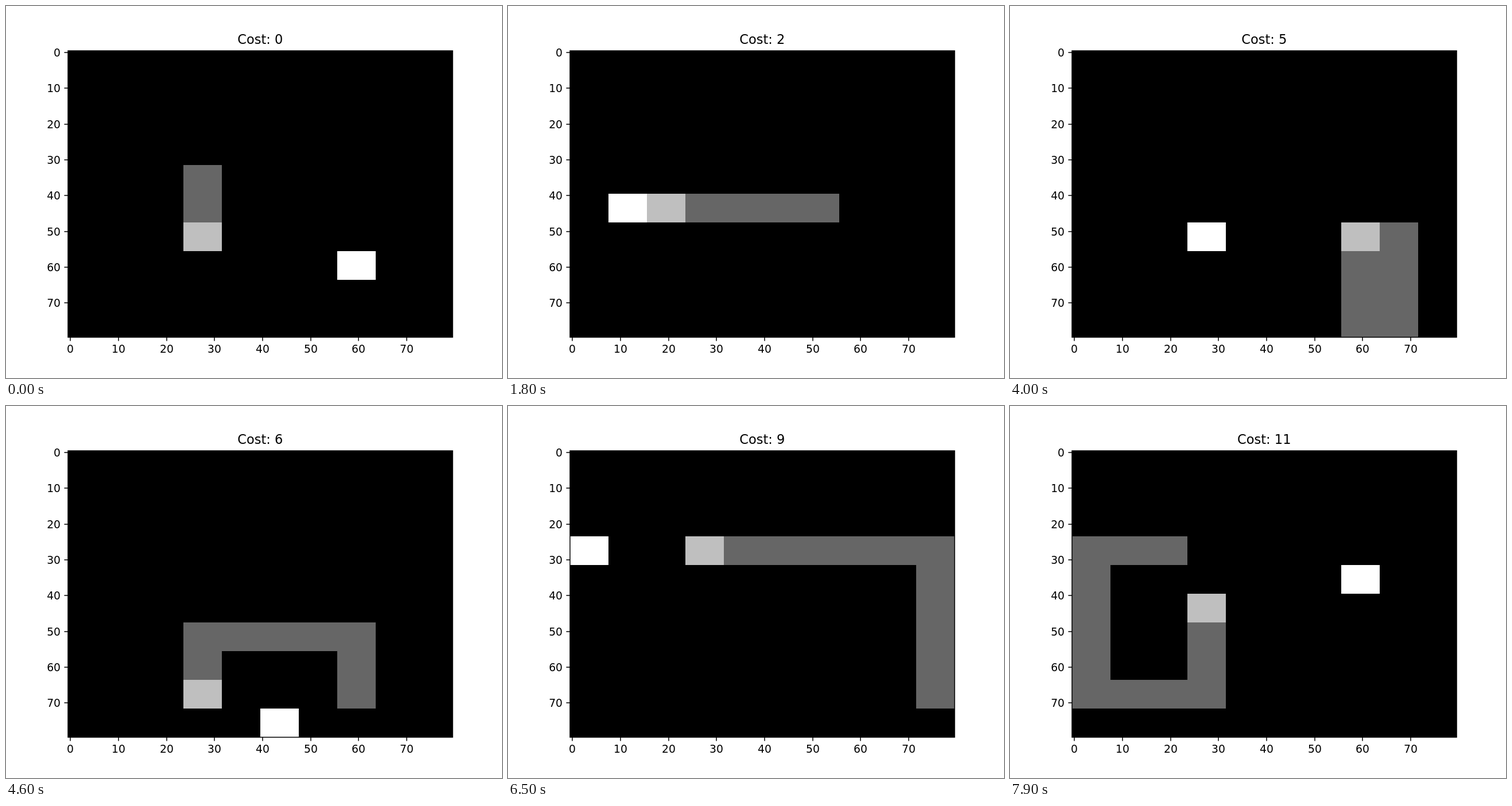
An HTML page with a canvas for the animation above (8 s loop, 864 by 648 pixels).

```html
<!DOCTYPE html>
<html lang="en">
<head>
<meta charset="utf-8">
<title>Grid snake</title>
<style>
  html, body { margin: 0; width: 100%; height: 100%; overflow: hidden; background: #fff; }
  canvas, svg { position: absolute; left: 0; top: 0; display: block; }
  text { font-family: "DejaVu Sans", Verdana, sans-serif; font-size: 18.75px; fill: #000; }
  #title { font-size: 22.5px; }
  .line { stroke: #000; stroke-width: 1.5; fill: none; }
</style>
</head>
<body>
<canvas id="board" width="864" height="648"></canvas>
<svg id="axes" width="864" height="648" viewBox="0 0 864 648">
  <rect class="line" x="108" y="78" width="670" height="499"/>
  <text id="title" x="442.8" y="66" text-anchor="middle">Cost: 0</text>
</svg>
<script>
const STEP = 100, STEPS = 80, START_LENGTH = 3;
const LEFT = 108, TOP = 77.76, CELL_W = 66.96, CELL_H = 49.896;
const ctx = document.getElementById('board').getContext('2d');
const axes = document.getElementById('axes');
const title = document.getElementById('title');

// Column and row digits: the corners of the route and the food in order.
const cells = s => s.split(' ').map(c => [+c[0], +c[1]]);
const corners = cells('34 37 77 79 89 85 15 18 78 75 85 89 79 76 36 39 99 93 03 08 38 35');
const foods = cells('77 89 15 78 85 36 59 99 93 03 38 74');
const same = (a, b) => a[0] === b[0] && a[1] === b[1];

const path = [corners[0]];
for (const goal of corners.slice(1)) {
  let at = path[path.length - 1];
  while (!same(at, goal)) {
    at = [at[0] + Math.sign(goal[0] - at[0]), at[1] + Math.sign(goal[1] - at[1])];
    path.push(at);
  }
}

// The cost rises as the head reaches food; the body grows one step later.
const costs = [];
let eaten = 0;
for (let i = 0; i < STEPS; i++) {
  if (same(path[i + START_LENGTH - 1], foods[eaten])) eaten++;
  costs.push(eaten);
}

function fillCell([c, r], color) {
  const x = Math.round(LEFT + c * CELL_W), y = Math.round(TOP + r * CELL_H);
  ctx.fillStyle = color;
  ctx.fillRect(x, y, Math.round(LEFT + (c + 1) * CELL_W) - x,
                     Math.round(TOP + (r + 1) * CELL_H) - y);
}

function add(tag, attrs, text = '') {
  const el = document.createElementNS(axes.namespaceURI, tag);
  for (const key in attrs) el.setAttribute(key, attrs[key]);
  el.textContent = text;
  axes.appendChild(el);
}

for (let v = 0; v < 80; v += 10) {
  const x = Math.round(LEFT + (v + 0.5) * CELL_W / 8);
  const y = Math.round(TOP + (v + 0.5) * CELL_H / 8);
  add('path', { class: 'line', d: `M${x} 577v6.56M108 ${y}h-6.56` });
  add('text', { x, y: 604, 'text-anchor': 'middle' }, v);
  add('text', { x: 95, y: y + 7, 'text-anchor': 'end' }, v);
}

function draw(step) {
  const head = step + START_LENGTH - 1;
  const length = START_LENGTH + (step ? costs[step - 1] : 0);
  ctx.fillStyle = '#fff';
  ctx.fillRect(0, 0, 864, 648);
  ctx.fillStyle = '#000';
  ctx.fillRect(108, 78, 670, 499);
  fillCell(foods[costs[step]], '#fff');
  for (let i = head - length + 1; i < head; i++) fillCell(path[i], '#666');
  fillCell(path[head], '#bfbfbf');
  title.textContent = 'Cost: ' + costs[step];
}

let shown = -1;
const begin = performance.now();
function tick() {
  const step = Math.floor(Math.max(0, performance.now() - begin) / STEP) % STEPS;
  if (step !== shown) draw(shown = step);
  requestAnimationFrame(tick);
}
tick();
</script>
</body>
</html>
```
